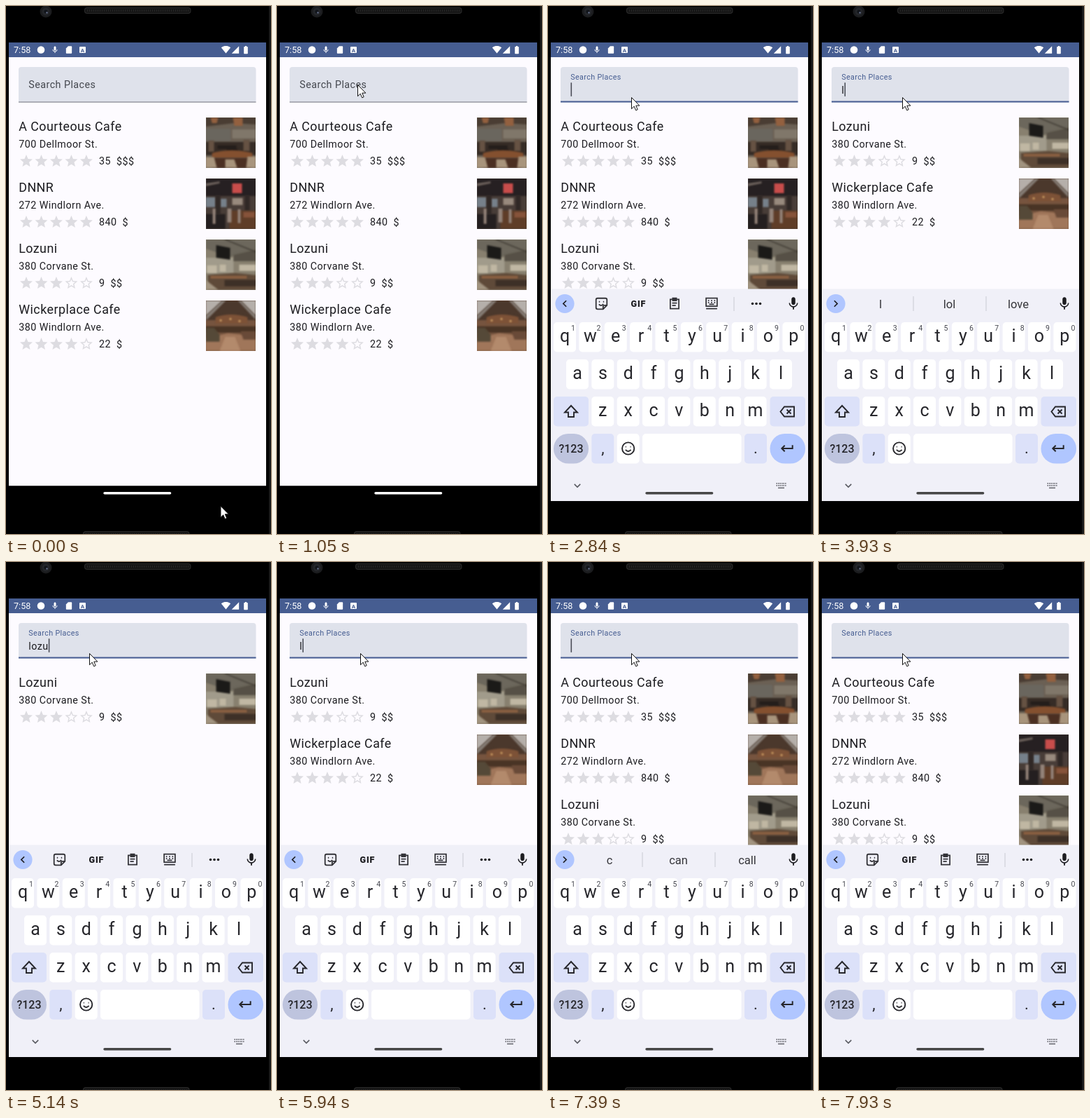
Animation, 379 px wide and 753 px high, one loop 8000 ms. Source, as an HTML page with a canvas:

```html
<!DOCTYPE html>
<html lang="en">
<head>
<meta charset="utf-8">
<title>Place search</title>
<style>
  html, body { margin: 0; width: 100%; height: 100%; overflow: hidden; background: #000; }
  canvas { display: block; }
</style>
</head>
<body>
<canvas id="stage" width="379" height="753"></canvas>
<script>
const ctx = document.getElementById('stage').getContext('2d');
const LOOP = 8000, PHOTO_LAG = 70, BLINK = 515, PHOTO_SIZE = 72;
const DP = 0.895;
const INK = '#1c1c20', KEY_INK = '#26262b', BLUE = '#465d91', KEY_BLUE = '#dce1f9', ACCENT = '#b0c6ff';

const STAR = 'M12 17.27L18.18 21l-1.64-7.03L22 9.24l-7.19-.61L12 2 9.19 8.63 2 9.24l5.46 4.73L5.82 21z';
const STAR_HOLE = 'M12 15.4l-3.76 2.27 1-4.28-3.32-2.88 4.38-.38L12 6.1l1.71 4.04 4.38.38-3.32 2.88 1 4.28z';
const MIC = 'M12 14c1.66 0 3-1.34 3-3V5c0-1.66-1.34-3-3-3S9 3.34 9 5v6c0 1.66 1.34 3 3 3zM17.3 11c0 3-2.54 5.1-5.3 5.1S6.7 14 6.7 11H5c0 3.41 2.72 6.23 6 6.72V21h2v-3.28c3.28-.48 6-3.3 6-6.72z';
const SD_CARD = 'M18 2h-8L4 8v12c0 1.1.9 2 2 2h12c1.1 0 2-.9 2-2V4c0-1.1-.9-2-2-2z';
const WIFI = 'M12 21L24 6C20 3 16 2 12 2S4 3 0 6z';
const SIGNAL = 'M2 22h20V2z';
const BATTERY = 'M15.7 4H14V2h-4v2H8.3C7.6 4 7 4.6 7 5.3v15.4C7 21.4 7.6 22 8.3 22h7.4c.7 0 1.3-.6 1.3-1.3V5.3C17 4.6 16.4 4 15.7 4z';
const STICKER = 'M6 3.5h12q2.5 0 2.5 2.5v8.5l-6 6H6q-2.5 0-2.5-2.5V6q0-2.5 2.5-2.5zM20.5 14.5H17q-2.5 0-2.5 2.5v3.5M8 9h1.5M14.5 9H16M8 13q3.5 4 7-.5';
const CLIPBOARD = 'M5 5h14v15H5zM9 3h6v4H9zM8 11h8M8 15h6';
const KEYBOARD = 'M3 3h18v13H3zM6 7h2M11 7h2M16 7h2M6 10h2M11 10h2M16 10h2M8 13h8M3 20h18';
const SHIFT = 'M12 3.5L3 13h5v6.5h8V13h5z';
const BACKSPACE = 'M8 5h14v14H8L2.5 12zM11.5 9l6 6M17.5 9l-6 6';
const ENTER = 'M20 7v5H4M8.5 7.5L4 12l4.5 4.5';
const SMILE = 'M21 12a9 9 0 1 1-18 0a9 9 0 1 1 18 0M8 9.5h1M15 9.5h1M8 14q4 4.5 8 0';

// Flat-shape photos on a 72 unit square: [colour, path]
const PHOTO_SHAPES = {
  cafe: [
    ['#6b6054', 'M0 0h72v72H0z'], ['#4a3d33', 'M0 0h72v10L40 8 0 13z'],
    ['#93603f', 'M7 0h11l-2 8H9zM39 0h14v12H41z'], ['#6a665e', 'M0 16h36v18H0z'],
    ['#80776a', 'M38 17h34v13H38z'], ['#362c26', 'M0 35h72v19H0z'],
    ['#665243', 'M4 33h8v16H4zM54 32h9v16h-9z'], ['#241e1b', 'M17 40h27v5H17zM30 45h16v6H30z'],
    ['#84502f', 'M9 51q28-8 58 0v7H9z'], ['#4b2f22', 'M10 58h54v14H10z'],
    ['#a8947c', 'M0 57h12l4 15H0zM28 60h13l4 12H28zM60 56h12v16H58z']
  ],
  diner: [
    ['#483d38', 'M0 0h72v72H0z'], ['#262022', 'M0 0h72v25H0z'],
    ['#6b605b', 'M0 7l20-3v3L0 11z'], ['#c84d4b', 'M38 7h14v14H38z'],
    ['#76808a', 'M0 27h14v14H0zM21 29h9v12h-9z'], ['#988a7e', 'M38 28h15v10H38z'],
    ['#302826', 'M14 24h7v27h-7zM56 24h7v22h-7z'], ['#5f3d28', 'M34 46h38v26H34z'],
    ['#241f20', 'M0 51h28v21H0z'], ['#938379', 'M10 43h4v22h-4zM31 43h6v20h-6zM46 44h4v20h-4z'],
    ['#86533a', 'M54 48h16v8H54z']
  ],
  bakery: [
    ['#88806f', 'M0 0h72v72H0z'], ['#6c675c', 'M0 0h72v14L36 25 0 13z'],
    ['#a19b8b', 'M0 26h40v22H0z'], ['#565046', 'M40 22l32-8v17H40z'],
    ['#454038', 'M30 0l42 17v2L26 0z'], ['#1b1a18', 'M15 8l20 4v17l-20-3z'],
    ['#c0b7a3', 'M2 37h14v11H2zM20 36h9v10h-9zM48 36h24v9H48z'],
    ['#5f4a39', 'M3 51l40-3 29 3v21H3z'], ['#8b6041', 'M7 52h52v4H7z'],
    ['#a29480', 'M0 58l18 14H0z'], ['#3d3027', 'M27 58h45v9H27z']
  ],
  hall: [
    ['#76543f', 'M0 0h72v72H0z'], ['#4b382c', 'M0 0h72v28H0z'],
    ['#b5afaa', 'M0 0h24L0 22zM50 0h22v22z'], ['#857c75', 'M24 0h5L0 29v-7zM46 0h4l22 22v6z'],
    ['#7d5237', 'M14 24q22-8 46 0v9H14z'], ['#493425', 'M0 37h72v9H0z'],
    ['#c79861', 'M20 27h3v3h-3zM34 25h3v3h-3zM47 28h3v3h-3z'],
    ['#a0765a', 'M0 54l32-7 40 4v21H0z'], ['#554938', 'M0 39h12l8 10v10H0z'],
    ['#694a38', 'M50 44h22v12H54z'], ['#b38a6c', 'M28 52h14l8 20H20z']
  ]
};

const PLACES = [
  { name: 'A Courteous Cafe', street: '700 Dellmoor St.', stars: 5, info: '35  $$$', photo: 'cafe' },
  { name: 'DNNR', street: '272 Windlorn Ave.', stars: 5, info: '840  $', photo: 'diner' },
  { name: 'Lozuni', street: '380 Corvane St.', stars: 3, info: '9  $$', photo: 'bakery' },
  { name: 'Wickerplace Cafe', street: '380 Windlorn Ave.', stars: 4, info: '22  $', photo: 'hall' }
];

// [time, value]: the last entry that has begun applies
const TYPED = [[0, ''], [1330, ''], [3860, 'l'], [4200, 'lo'], [4600, 'loz'], [5000, 'lozu'],
  [5540, 'loz'], [5680, 'lo'], [5810, 'l'], [5950, ''], [6330, 'c'], [7390, '']];
const SUGGESTED = [[0, null], [3930, ['l', 'lol', 'love']], [4270, ['lo', 'lot', 'love']],
  [4670, ['loz', 'log', 'lot']], [5070, null], [6400, ['c', 'can', 'call']], [7530, null]];
const POINTER = [[0, 306.5, 712.7], [69, 306.5, 712.7], [70, 295, 709], [230, 295, 709],
  [850, 118, 74], [1050, 115, 112], [2230, 115, 112], [2350, 119, 130], [LOOP, 119, 130]];

const clamp = v => Math.max(0, Math.min(1, v));
const mix = (a, b, p) => a + (b - a) * p;
const smooth = p => p * p * (3 - 2 * p);
const current = (track, t) => track.filter(e => e[0] <= Math.max(0, t)).pop();
const matches = query => PLACES.filter(p => p.name.toLowerCase().includes(query));

function rect(x, y, w, h, color, radius = 0) {
  ctx.fillStyle = color;
  ctx.beginPath();
  ctx.roundRect(x, y, w, h, radius);
  ctx.fill();
}

function disc(x, y, r, color) {
  rect(x - r, y - r, 2 * r, 2 * r, color, r);
}

function text(str, x, y, size, color = INK, { spacing = 0, align = 'left', weight = 400 } = {}) {
  ctx.font = `${weight} ${size}px Roboto, sans-serif`;
  ctx.letterSpacing = spacing + 'px';
  ctx.textAlign = align;
  ctx.fillStyle = color;
  ctx.fillText(str, x, y);
}

function centered(str, x, y, size, color, weight) {
  text(str, x, y, size, color, { align: 'center', weight });
}

// Icons live on a 24 unit grid; a line width turns the fill into a stroke
function icon(path, cx, cy, size, color, line = 0) {
  ctx.save();
  ctx.translate(cx - size / 2, cy - size / 2);
  ctx.scale(size / 24, size / 24);
  const shape = new Path2D(path);
  ctx.fillStyle = ctx.strokeStyle = color;
  ctx.lineWidth = line;
  if (line) ctx.stroke(shape); else ctx.fill(shape, 'evenodd');
  ctx.restore();
}

// Softened once up front, so each frame only copies the result
function paintPhoto(shapes) {
  const canvas = document.createElement('canvas');
  canvas.width = canvas.height = PHOTO_SIZE;
  const pen = canvas.getContext('2d');
  shapes.forEach(([color, path], i) => {
    pen.filter = i ? 'blur(1.2px)' : 'none';
    pen.fillStyle = color;
    pen.fill(new Path2D(path));
  });
  return canvas;
}

const PHOTOS = Object.fromEntries(
  Object.entries(PHOTO_SHAPES).map(([name, shapes]) => [name, paintPhoto(shapes)]));

function drawDevice() {
  rect(0, 0, 379, 753, '#000');
  rect(376, 0, 3, 753, '#191919');
  disc(57, 8, 8.5, '#1b1c1e');
  disc(57, 8, 5.5, '#24262a');
  disc(57, 8, 2.5, '#11141a');
  disc(58.5, 9.5, 1.2, '#66708a');
  for (const [x, y] of [[112, 2], [110, 749]]) {
    rect(x, y, 152.5, 9, '#2c2c2c', 4);
    rect(x + 1, y + 1, 150.5, 7, '#151515', 3);
    for (let dx = 4; dx < 150; dx += 3) rect(x + dx, y + 3, 1.2, 3, '#272727');
  }
}

function drawStatusBar() {
  rect(4, 52, 368, 21, BLUE);
  text('7:58', 11, 67, 12.6, '#fff');
  disc(50, 62.5, 5.3, '#fff');
  icon(MIC, 70, 62.5, 12, '#fff');
  icon(SD_CARD, 90, 62.5, 12.5, '#fff');
  rect(105, 58, 9, 9, '#fff', 1);
  centered('A', 109.5, 65.5, 8, BLUE, 700);
  icon(WIFI, 314.5, 62.5, 13.5, '#fff');
  icon(SIGNAL, 328, 62.5, 12.5, '#fff');
  icon(BATTERY, 343, 62.5, 13.5, '#fff');
}

function drawSearch(t, typed) {
  const focus = smooth(clamp((t - 1100) / 150));
  const focused = t >= 1120;
  rect(18, 87, 339.5, 50.4, '#dfe2eb', [4, 4, 0, 0]);
  if (focused) rect(18, 135.6, 339.5, 1.8, BLUE);
  else rect(18, 136.4, 339.5, 1, '#74777f');
  text('Search Places', 32.3, mix(117, 105.3, focus), mix(14.3, 10.74, focus),
    focused ? BLUE : '#44474e', { spacing: mix(0.45, 0.36, focus) });

  const [since, query] = typed;
  text(query, 32.3, 125, 14.3, INK, { spacing: 0.45 });
  const caretOn = since > 0 && Math.floor((t - since) / BLINK) % 2 === 0;
  if (caretOn) rect(32.5 + ctx.measureText(query).width, 109.3, 1.6, 19.5, '#4a4d57');
}

function drawPlace(place, photo, y) {
  const spacing = 0.45;
  text(place.name, 18.2, y + 19, 17.9, INK, { spacing });
  text(place.street, 18.2, y + 43.4, 14.3, INK, { spacing });
  for (let i = 0; i < 5; i++)
    icon(i < place.stars ? STAR : STAR + STAR_HOLE, 29 + i * 24 * DP, y + 62, 24 * DP, '#dddce1');
  text(place.info, 133, y + 67.4, 14.3, INK, { spacing });
  ctx.drawImage(PHOTOS[photo], 285.6, y, 71.8, 71.6);
}

function drawStrip(words) {
  const y = 424.5;
  disc(24, y, 13.6, ACCENT);
  icon(words ? 'M9 6l6 6-6 6' : 'M15 6l-6 6 6 6', 24, y, 17, INK, 2.4);
  icon(MIC, 351, y, 22, INK);
  if (words) {
    words.forEach((word, i) => centered(word, 88 + i * 98.5, y + 6, 16.5, '#35353a'));
    for (const x of [134.5, 238.5]) rect(x, 414, 1, 21, '#c8c9d2');
    return;
  }
  icon(STICKER, 76.5, y, 22, '#333338', 2);
  text('GIF', 129.3, y + 4.5, 12.6, INK, { align: 'center', weight: 900, spacing: 0.7 });
  icon(CLIPBOARD, 181, y, 21, '#333338', 2);
  icon(KEYBOARD, 234, y, 21, '#333338', 2);
  rect(265.5, 415, 1, 20, '#c8c9d2');
  for (const x of [292.5, 298, 303.5]) disc(x, y, 1.8, INK);
}

function drawLetters(letters, firstX, y) {
  [...letters].forEach((letter, i) => {
    const x = firstX + i * 36.37;
    rect(x - 16, y, 32, 42.5, '#fff', 5);
    centered(letter, x, y + 28, 25, KEY_INK);
  });
}

function drawKeyboard(t, words) {
  const hidden = Math.pow(1 - clamp((t - 1260) / 400), 3) * 302.5;
  if (hidden >= 302) return;
  ctx.save();
  ctx.beginPath();
  ctx.rect(4, 52, 368, 654);
  ctx.clip();
  ctx.translate(0, hidden);
  rect(4, 403.5, 368, 303, '#f0f0f8');
  drawStrip(words);

  drawLetters('qwertyuiop', 24, 451);
  for (let i = 0; i < 10; i++) centered((i + 1) % 10, 36 + i * 36.37, 463.3, 10.5, '#45464f');
  drawLetters('asdfghjkl', 42, 504);
  drawLetters('zxcvbnm', 78.3, 557);

  rect(8, 557, 50, 42.5, KEY_BLUE, 5);
  icon(SHIFT, 33, 578.5, 24, KEY_INK, 1.9);
  rect(317.5, 557, 50.5, 42.5, KEY_BLUE, 5);
  icon(BACKSPACE, 342, 578.5, 24, KEY_INK, 1.9);

  rect(8, 610, 50, 42.5, '#bec4de', 21);
  centered('?123', 33, 636.5, 16, KEY_INK, 500);
  rect(62.3, 610, 32, 42.5, KEY_BLUE, 5);
  centered(',', 78.3, 638, 22, KEY_INK);
  rect(98.7, 610, 32, 42.5, '#fff', 5);
  icon(SMILE, 114.7, 631, 23, KEY_INK, 2);
  rect(135, 610, 141.5, 42.5, '#fff', 5);
  rect(281, 610, 32, 42.5, KEY_BLUE, 5);
  centered('.', 297, 638, 22, KEY_INK);
  rect(317.5, 610, 50.5, 42.5, ACCENT, 21);
  icon(ENTER, 342, 631, 23, KEY_INK, 2.1);

  icon('M6 9l6 6 6-6', 42, 684, 17, '#55565d', 2);
  for (let i = 0; i < 12; i++) rect(326.5 + (i % 6) * 2.5, 680 + Math.floor(i / 6) * 3, 1.5, 1.7, '#6a6b72');
  rect(329, 686.5, 9, 1.6, '#6a6b72');
  ctx.restore();
}

function drawHomeBar(t) {
  const shade = Math.round(mix(250, 70, clamp((t - 1800) / 240)));
  rect(139.3, 693, 97, 3.5, `rgb(${shade},${shade},${shade})`, 1.75);
}

function drawPointer(t) {
  const i = POINTER.findIndex(p => p[0] > t);
  const [t0, x0, y0] = POINTER[i - 1], [t1, x1, y1] = POINTER[i];
  const p = smooth((t - t0) / (t1 - t0));
  ctx.save();
  ctx.translate(mix(x0, x1, p), mix(y0, y1, p));
  const arrow = new Path2D('M.5 .5v16.2l3.7-3.6 2.5 5.7 2.5-1.1-2.4-5.6h5.1z');
  ctx.fillStyle = '#fff';
  ctx.strokeStyle = '#111';
  ctx.lineWidth = 1;
  ctx.fill(arrow);
  ctx.stroke(arrow);
  ctx.restore();
}

function draw(t) {
  const typed = current(TYPED, t);
  const places = matches(typed[1]);
  const loaded = matches(current(TYPED, t - PHOTO_LAG)[1]);
  drawDevice();
  rect(4, 73, 368, 611.3, '#fdfbff');
  drawStatusBar();
  drawSearch(t, typed);
  places.forEach((place, i) => drawPlace(place, (loaded[i] || place).photo, 159 + i * 87));
  drawKeyboard(t, current(SUGGESTED, t)[1]);
  drawHomeBar(t);
  drawPointer(t);
}

const start = performance.now();
function frame() {
  draw((performance.now() - start) % LOOP);
  requestAnimationFrame(frame);
}
frame();
</script>
</body>
</html>
```
